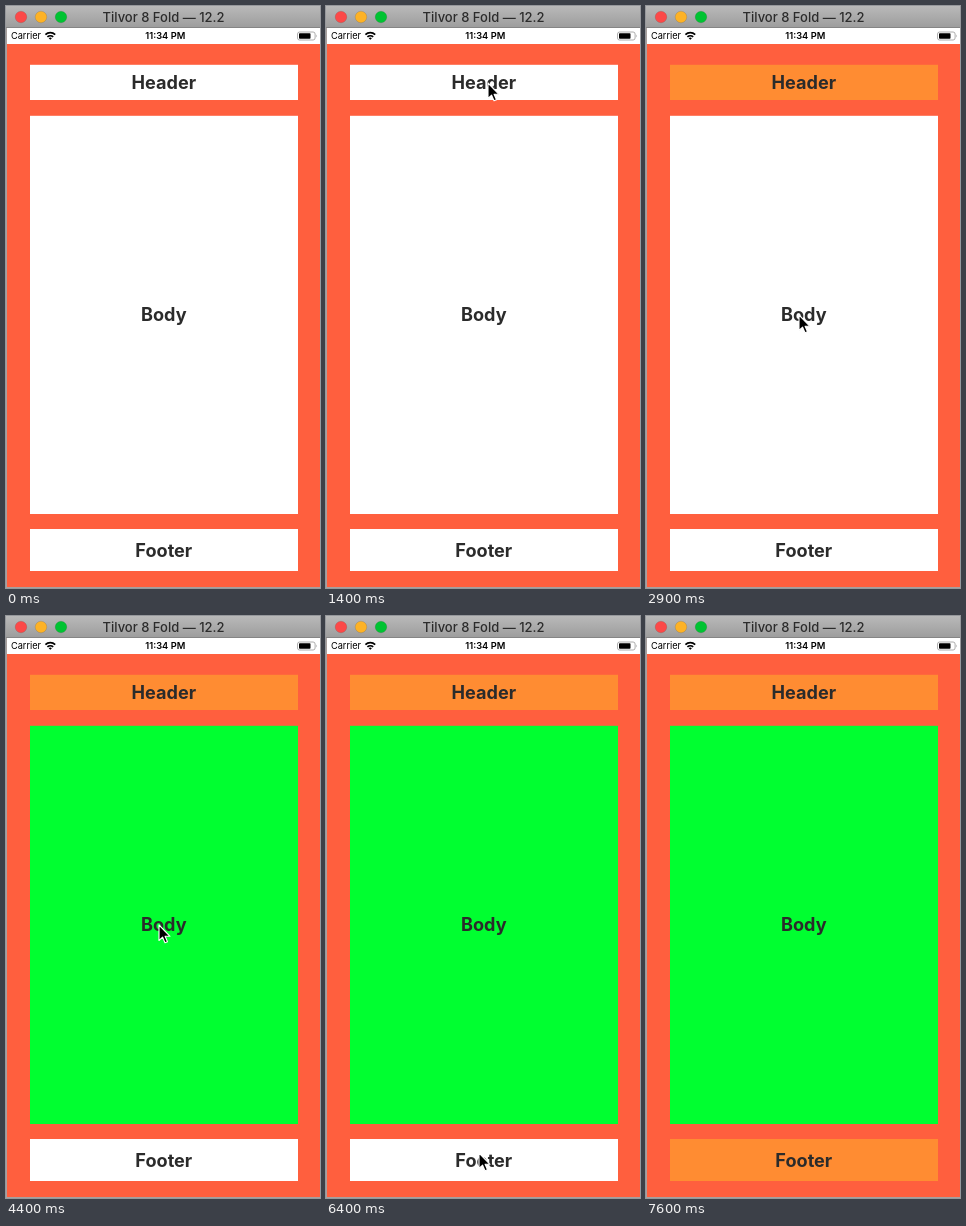
Recreate the animation shown at these times as an HTML page. Size 314 px wide and 582 px high, loop 8000 ms.

```html
<!DOCTYPE html>
<html lang="en">
<meta charset="utf-8">
<title>Header, body, footer</title>
<style>
  html, body { margin: 0; width: 100%; height: 100%; overflow: hidden; }
  svg { display: block; font-family: Inter, Roboto, sans-serif; }
  #panels text { font-size: 18.1px; font-weight: 700; fill: #2b2b2b; text-anchor: middle; }
  .mid { text-anchor: middle; }
</style>
<svg width="314" height="582" viewBox="0 0 314 582">
  <linearGradient id="bar" x2="0" y2="1">
    <stop stop-color="#b9b9b9"/>
    <stop offset="1" stop-color="#9c9c9c"/>
  </linearGradient>

  <rect width="314" height="582" fill="#a8a09e"/>
  <rect x="1" y="38" width="313" height="543" fill="#ff5f3e"/>

  <!-- title bar -->
  <rect width="314" height="22" fill="url(#bar)"/>
  <rect y="21" width="314" height="1" fill="#858585"/>
  <g stroke="#000" stroke-opacity=".15" stroke-width=".7">
    <circle cx="15" cy="11" r="5.8" fill="#fc4948"/>
    <circle cx="35" cy="11" r="5.8" fill="#fdb225"/>
    <circle cx="55" cy="11" r="5.8" fill="#00c332"/>
  </g>
  <text class="mid" x="157.5" y="16" font-size="13" font-weight="500" fill="#2c2c2c">Tilvor 8 Fold — 12.2</text>

  <!-- status bar -->
  <rect x="1" y="22" width="313" height="16" fill="#fff"/>
  <text x="5" y="33" font-size="9.2">Carrier</text>
  <path d="M39.4 28.7a7 7 0 0 1 9.8 0M41.4 30.9a4.2 4.2 0 0 1 5.8 0" fill="none" stroke="#000" stroke-width="1.7"/>
  <path d="M44.3 33.8l-1.6-1.6a2.3 2.3 0 0 1 3.2 0z"/>
  <text class="mid" x="159.3" y="33" font-size="9.3" font-weight="600">11:34 PM</text>
  <rect x="291.5" y="26" width="17.6" height="8" rx="2" fill="none" stroke="#999" stroke-width=".8"/>
  <rect x="293" y="27.3" width="11.5" height="5.4" rx=".8"/>
  <path d="M310.2 28.6q1.4 1.4 0 2.8z" fill="#999"/>

  <g id="panels"></g>
  <path id="cursor" d="M0 0V15.5L3.6 12.2 6 17.8 8.5 16.8 6.1 11.3H11Z"
        stroke="#fff" stroke-width="1.1" stroke-linejoin="round"/>
</svg>
<script>
  const LOOP = 8000, STEP = 100;
  const ORANGE = '#ff8c32', GREEN = '#00ff30';
  const $ = id => document.getElementById(id);

  const panels = [
    { name: 'Header', top: 58.8, bottom: 94, tap: 1600, colour: ORANGE },
    { name: 'Body', top: 109.8, bottom: 508, tap: 4400, colour: GREEN },
    { name: 'Footer', top: 523, bottom: 565, tap: 6900, colour: ORANGE }
  ];

  // where the pointer rests, and when
  const rests = [
    { from: 700, to: 700, x: 176, y: 71 },
    { from: 1100, to: 2000, x: 162, y: 77 },
    { from: 2900, to: 4900, x: 153, y: 309 },
    { from: 6400, to: 7300, x: 153, y: 537 },
    { from: 7500, to: 7500, x: 167, y: 502 }
  ];

  $('panels').innerHTML = panels.map(({ name, top, bottom }) => `
    <rect id="${name}" x="24" y="${top}" width="268" height="${bottom - top}"/>
    <text x="157.8" y="${(top + bottom) / 2 + 6.5}">${name}</text>`).join('');

  const smooth = k => k * k * (3 - 2 * k);

  function pointerAt(t) {
    const i = rests.findIndex(r => t <= r.to);
    if (i < 0 || t < rests[0].from) return null;
    const b = rests[i], a = rests[i - 1] ?? b;
    const k = t >= b.from ? 1 : smooth((t - a.to) / (b.from - a.to));
    return [a.x + (b.x - a.x) * k, a.y + (b.y - a.y) * k];
  }

  function draw(now) {
    const t = Math.floor(now % LOOP / STEP) * STEP;
    for (const { name, tap, colour } of panels) $(name).setAttribute('fill', t < tap ? '#fff' : colour);
    const p = pointerAt(t);
    $('cursor').setAttribute('visibility', p ? 'visible' : 'hidden');
    if (p) $('cursor').setAttribute('transform', `translate(${p})`);
  }

  let start;
  function tick(now) {
    start ??= now;
    draw(now - start);
    requestAnimationFrame(tick);
  }
  draw(0);
  requestAnimationFrame(tick);
</script>
</html>
```
